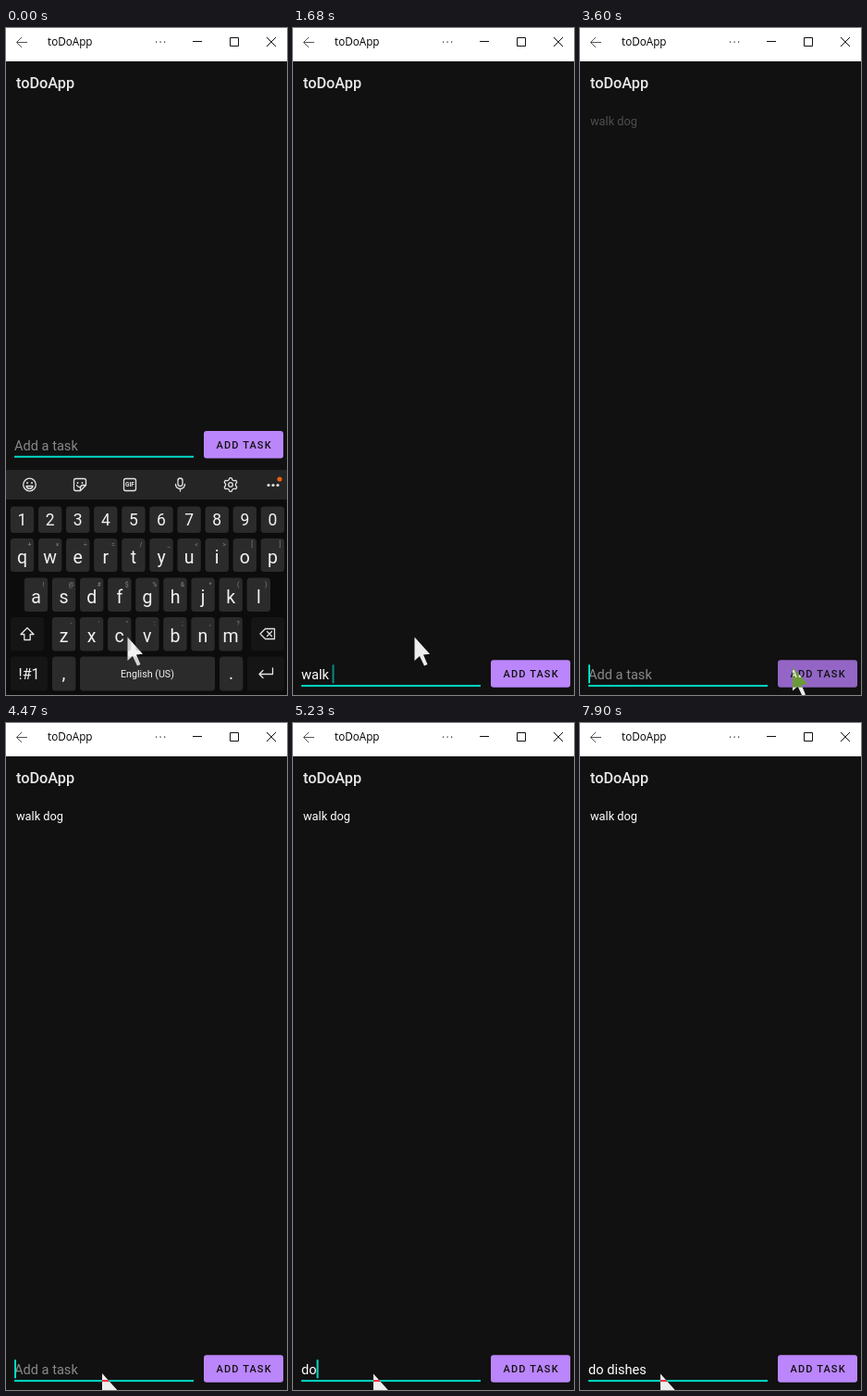
An HTML page for the animation above (8 s loop, 304 by 720 pixels).

```html
<!DOCTYPE html>
<html lang="en">
<head>
<meta charset="utf-8">
<title>toDoApp</title>
<style>
html, body { margin: 0; width: 100%; height: 100%; overflow: hidden; background: #111; }
svg { display: block; width: 304px; height: 720px; }
text { font-family: Roboto, "Noto Sans", sans-serif; white-space: pre; }
.mid { text-anchor: middle; }
.line { fill: none; stroke: #111; stroke-width: 1; }
.icon { fill: none; stroke: #e4e4e4; stroke-width: 1.3; stroke-linecap: round; stroke-linejoin: round; }
.solid { fill: #e4e4e4; stroke: none; }
#cursor { mix-blend-mode: difference; }
</style>
</head>
<body>
<svg viewBox="0 0 304 720" xmlns="http://www.w3.org/2000/svg">
  <rect width="304" height="720" fill="#111"/>
  <rect width="304" height="36" fill="#fff"/>
  <path class="line" style="stroke:#555" d="M23 15.5H11.5M17 10L11.5 15.5L17 21"/>
  <text x="45" y="19" style="font:11.7px 'Open Sans','Noto Sans',sans-serif">toDoApp</text>
  <path d="M162 14.5h1.2v1.2h-1.2zM166.5 14.5h1.2v1.2h-1.2zM171 14.5h1.2v1.2h-1.2z" fill="#222"/>
  <path class="line" d="M202 14.5h10M242.500 10.500h9v9h-9zM282 10l10 10M292 10l-10 10"/>
  <text x="11" y="65" font-size="16.3" font-weight="500" fill="#e8e8e8">toDoApp</text>
  <text id="task" x="11" y="105" font-size="12.8" fill="#fff">walk dog</text>

  <g id="bar">
    <text id="hint" x="9" y="456" font-size="14.6" fill="#888">Add a task</text>
    <text id="entry" x="9" y="456" font-size="14.6" fill="#fff" xml:space="preserve"></text>
    <rect id="caret" y="440" width="2" height="20" fill="#03dac5"/>
    <rect x="9" y="461.800" width="194" height="2" fill="#03dac5"/>
    <rect id="button" x="214" y="435" width="86" height="29.500" rx="3"/>
    <text x="227.500" y="454" font-size="11" font-weight="500" letter-spacing="1.150" fill="#111">ADD TASK</text>
  </g>

  <g id="keyboard">
    <rect y="477" width="304" height="268" fill="#0c0c0c"/>
    <rect y="477" width="304" height="32" fill="#252525"/>
    <g class="icon">
      <circle cx="25.500" cy="493" r="6.800"/>
      <path d="M22 494.500a3.600 3.600 0 0 0 7 0z"/>
      <circle class="solid" cx="23" cy="491" r="1"/><circle class="solid" cx="28" cy="491" r="1"/>
      <path d="M75.500 486.500h9a2 2 0 0 1 2 2v5l-6 6h-5a2 2 0 0 1-2-2v-9a2 2 0 0 1 2-2zM86.500 493.500h-3a3 3 0 0 0-3 3v3M76.500 493.500q1.500 2.500 3.500 2"/>
      <circle class="solid" cx="77.500" cy="491" r=".9"/><circle class="solid" cx="82.500" cy="491" r=".9"/>
      <rect x="127.500" y="486.500" width="13" height="13" rx="2"/>
      <rect x="186" y="486" width="5" height="8.500" rx="2.500"/>
      <path d="M183.500 492.500a5 5 0 0 0 10 0M188.500 497.500v2.500"/>
      <path id="gear"/>
      <circle cx="243" cy="493" r="2.300"/>
    </g>
    <text class="mid" x="134" y="495.400" font-size="6.500" font-weight="700" fill="#e4e4e4">GIF</text>
    <g fill="#e4e4e4"><circle cx="284" cy="493.500" r="1.600"/><circle cx="289" cy="493.500" r="1.600"/><circle cx="294" cy="493.500" r="1.600"/></g>
    <circle cx="296" cy="487" r="2.600" fill="#e8600c"/>
    <g id="keys"></g>
    <g class="icon">
      <path d="M23 647.500l7 7h-3.800v6h-6.400v-6H16z"/>
      <path d="M280.500 648.500h10v11h-10l-5.500-5.500zM282.500 651.500l5 5M287.500 651.500l-5 5"/>
      <path d="M288.500 691v6.500h-14M278 693.500l-4 4l4 4"/>
    </g>
  </g>

  <path id="cursor" fill="#fff" d="M0 0V25.500L5.500 20.500L10.500 31L14 29.500L9.500 19L16.500 18.300Z"/>
</svg>
<script>
const $ = id => document.getElementById(id);
const LOOP = 8000, DROP = 247.3, PITCH = 30.1;

function add(tag, attrs, label) {
  const el = document.createElementNS("http://www.w3.org/2000/svg", tag);
  for (const k in attrs) el.setAttribute(k, attrs[k]);
  if (label) el.textContent = label;
  $("keys").append(el);
}

function key(x, y, w, h, fill = "#2b2b2b") {
  add("rect", { x, y, width: w, height: h, rx: 3.5, fill });
}

function label(s, x, y, size, fill = "#f2f2f2") {
  add("text", { class: "mid", x, y, "font-size": size, fill }, s);
}

function row(chars, first, y, h, base, size, alts = "") {
  [...chars].forEach((c, i) => {
    const x = first + i * PITCH;
    key(x - 12.7, y, 25.4, h);
    label(c, x, base, size);
    if (alts) label(alts[i], x + 8, y + 9, 7, "#858585");
  });
}

row("1234567890", 17.5, 516.5, 28.5, 537.2, 17.5);
row("qwertyuiop", 17.5, 551, 36, 578.3, 19.5, "+×÷=/_<>[]");
row("asdfghjkl", 32.5, 593.5, 36.5, 621, 19.5, "!@#$%&*()");
row("zxcvbnm", 62.5, 636, 36.5, 663.3, 19.5, "-'\":;,?");
const DARK = "#151515";
key(5, 636, 36, 36.5, DARK);
key(265, 636, 36, 36.5, DARK);
key(5, 678.5, 40, 37, DARK);
key(50, 678.5, 25.4, 37);
key(80, 678.5, 146, 37);
key(231, 678.5, 25.4, 37);
key(261, 678.5, 40, 37, DARK);
label("!#1", 25, 703, 16);
label(",", 62.5, 703, 19.5);
label("English (US)", 153, 701, 10.7);
label(".", 243.5, 703, 19.5);

const teeth = Array.from({ length: 24 }, (_, i) => {
  const a = (i - .5) * Math.PI / 12, r = i % 4 < 2 ? 7.4 : 5.4;
  return (243 + r * Math.sin(a)).toFixed(1) + " " + (493 - r * Math.cos(a)).toFixed(1);
});
$("gear").setAttribute("d", "M" + teeth.join("L") + "Z");

// Each step changes only the listed properties; kb is [offset, opacity].
const LIT = "#bb86fc", PRESSED = "#9366c6";
const SHOWN = [0, 1], LEAVING = [25, .65], HIDDEN = [0, 0];
const steps = [
  [0, { text: "", caret: 0, kb: SHOWN, up: true, task: 0, button: LIT, at: [131.5, 657.5] }],
  [250, { caret: 1 }],
  [620, { text: "w", kb: LEAVING, up: false }],
  [770, { kb: HIDDEN }],
  [1050, { text: "wal" }],
  [1170, { text: "walk" }],
  [1680, { text: "walk ", caret: .6 }],
  [2230, { text: "walk d", caret: 1 }],
  [2480, { text: "walk dog" }],
  [2910, { at: [150, 662] }],
  [3050, { at: [196, 676] }],
  [3190, { at: [226, 688] }],
  [3330, { at: [230, 690], button: "#a776e2" }],
  [3470, { text: "", button: PRESSED }],
  [3600, { task: .25 }],
  [3750, { task: .65, button: "#a776e2" }],
  [3900, { task: 1, button: LIT }],
  [4050, { at: [214, 692] }],
  [4190, { at: [160, 698] }],
  [4340, { at: [104, 702] }],
  [4480, { at: [87, 702.5], kb: [60, .4] }],
  [4620, { kb: [10, .85] }],
  [4770, { kb: SHOWN, up: true }],
  [5080, { text: "d", kb: LEAVING, up: false }],
  [5230, { text: "do", kb: HIDDEN }],
  [5510, { text: "do " }],
  [5630, { text: "do s" }],
  [6180, { caret: 0 }],
  [6330, { text: "do ", caret: 1 }],
  ...[..."dishes"].map((_, i) => [6730 + i * 132, { text: "do " + "dishes".slice(0, i + 1) }]),
  [7900, { caret: 0 }]
];

function draw(t) {
  const s = {};
  for (const [start, change] of steps) if (start <= t) Object.assign(s, change);
  const entry = $("entry");
  entry.textContent = s.text;
  $("hint").style.opacity = s.text ? 0 : 1;
  $("caret").setAttribute("x", 9 + (s.text ? entry.getComputedTextLength() : 0));
  $("caret").style.opacity = s.caret;
  $("bar").setAttribute("transform", `translate(0 ${s.up ? 0 : DROP})`);
  $("button").setAttribute("fill", s.button);
  $("task").style.opacity = s.task;
  $("keyboard").setAttribute("transform", `translate(0 ${s.kb[0]})`);
  $("keyboard").style.opacity = s.kb[1];
  $("cursor").setAttribute("transform", `translate(${s.at})`);
}

const begin = performance.now();
function tick() {
  draw((performance.now() - begin) % LOOP);
  requestAnimationFrame(tick);
}
tick();
</script>
</body>
</html>
```
